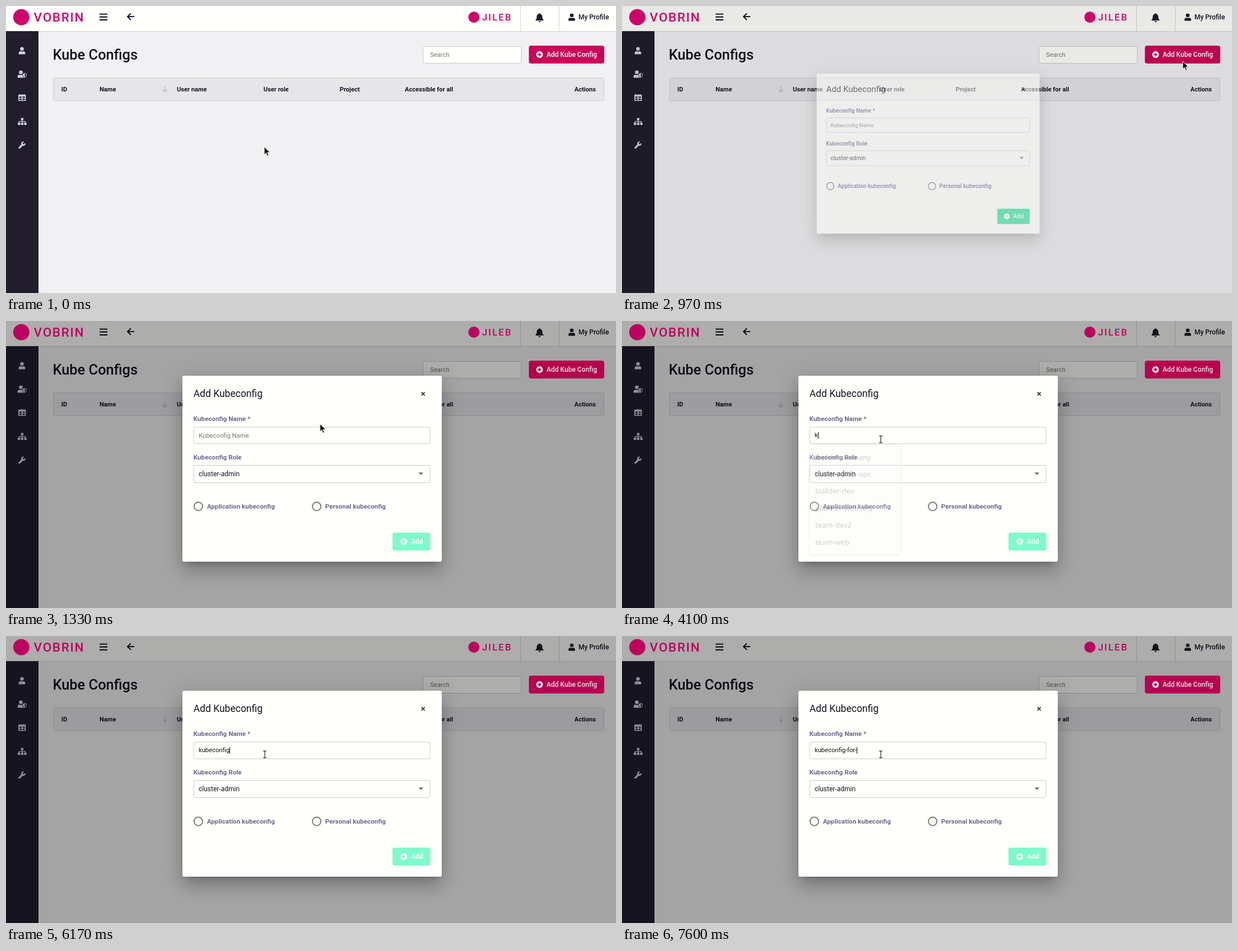
An HTML page that plays this animation: 1089x514 px, repeating every 8 s.

```html
<!DOCTYPE html>
<html lang="en">
<head>
<meta charset="utf-8">
<title>Add Kubeconfig</title>
<style>
  html, body { margin: 0; width: 100%; height: 100%; overflow: hidden; }
  body { position: relative; background: #f1f1f3; font-family: Roboto, sans-serif; }
  .layer { position: absolute; left: 0; top: 0; width: 1089px; height: 514px; }
  svg.layer { display: block; overflow: hidden; }
  svg text { fill: #15121f; }

  .title { font-size: 25.4px; font-weight: 500; }
  .head text { font-size: 11.1px; font-weight: 700; }
  .ui { font-size: 12px; }
  .medium { font-weight: 500; }
  .hint { font-size: 11.3px; }
  svg .hint { fill: #757575; }
  .labels text { font-size: 11.7px; font-weight: 700; fill: #6d6790; }
  svg .light { fill: #fff; }
  svg .brand { fill: #d0036a; font-weight: 500; }
  .field { fill: #fffffc; stroke: #c9c9cd; }
  .nav { fill: #d3d1dc; color: #d3d1dc; }

  .loop, .loop * { animation-duration: 8s; animation-iteration-count: infinite; animation-timing-function: linear; }

  #accent { animation-name: accent; }
  #addConfig { animation-name: hover; }
  #backdrop { background: rgba(0, 0, 0, .32); animation-name: backdrop; }
  #dialog { transform-origin: 546.5px 264.5px; animation-name: dialog; }
  #panel {
    position: absolute; left: 315px; top: 98px; width: 463px; height: 333px;
    border-radius: 3px; background: #fffffb;
    box-shadow: 0 9px 12px -6px rgba(0,0,0,.2), 0 19px 30px 2px rgba(0,0,0,.14), 0 7px 37px 6px rgba(0,0,0,.12);
  }
  #submit { animation-name: submit; }
  #entry { position: absolute; left: 344px; top: 199px; height: 12px; display: flex; font-size: 11.2px; line-height: 12px; white-space: pre; color: #111; }
  #caret { width: 1px; height: 12px; background: #000; }

  #menu {
    position: absolute; left: 335px; top: 221px; width: 162px; height: 197px; box-sizing: border-box; padding: 7.5px 10px;
    border-radius: 0 0 3px 3px; background: #f9f9f9; box-shadow: 0 1px 4px rgba(0,0,0,.42);
    font: 500 13px/30.4px "Noto Sans", sans-serif; color: #333; animation-name: menu;
  }
  #pointer { animation-name: pointer; }
  #arrow { animation-name: arrow; }
  #beam { animation-name: beam; }

  @keyframes accent { 0%, 11.725% { filter: brightness(1); } 16.725%, 100% { filter: brightness(.9); } }
  @keyframes hover { 0%, 9.5% { fill: #cc0058; } 10.5%, 16% { fill: #c00051; } 17%, 100% { fill: #cc0058; } }
  @keyframes backdrop {
    0% { opacity: 0; }
    11.725% { opacity: 0; animation-timing-function: cubic-bezier(.25, .8, .25, 1); }
    16.725%, 100% { opacity: 1; }
  }
  @keyframes dialog {
    0% { opacity: 0; transform: scale(.7); }
    11.725% { opacity: 0; transform: scale(.7); animation-timing-function: cubic-bezier(0, 0, .2, 1); }
    13.6%, 100% { opacity: 1; transform: none; }
  }
  @keyframes submit { 0%, 12.5% { fill: #16de90; } 16%, 100% { fill: #7ffacb; } }
  @keyframes menu { 0%, 48.374% { opacity: 0; } 48.375%, 49.5% { opacity: 1; } 51.8%, 100% { opacity: 0; } }
  @keyframes pointer {
    0% { transform: translate(461px, 252px); }
    1.25% { transform: translate(461px, 252px); animation-timing-function: steps(4, start); }
    6.25% { transform: translate(988px, 175px); }
    7.5% { transform: translate(988px, 175px); animation-timing-function: ease-out; }
    10.6%, 13.4% { transform: translate(1001px, 99px); animation-timing-function: ease-in-out; }
    16.6%, 17.499% { transform: translate(560.5px, 184px); }
    17.5% { transform: translate(560px, 186px); }
    17.875% { transform: translate(560px, 186px); animation-timing-function: steps(4, start); }
    22.875%, 100% { transform: translate(462px, 212px); }
  }
  @keyframes arrow { 0%, 17.499% { opacity: 1; } 17.5%, 100% { opacity: 0; } }
  @keyframes beam { 0%, 17.499% { opacity: 0; } 17.5%, 100% { opacity: 1; } }
</style>
</head>
<body>

<svg class="layer" viewBox="0 0 1089 514">
  <defs>
    <g id="user">
      <circle cy="-3.2" r="3.3"/>
      <path d="M-6 6.4V4.6C-6 2.3-4.4.9-2.4.9Q0 2 2.4.9C4.4.9 6 2.3 6 4.6V5.2Q6 6.4 4.8 6.4H-4.8Q-6 6.4-6 5.2z"/>
    </g>
    <g id="plus">
      <circle r="6" fill="#fff"/>
      <path d="M-3.3 0H3.3M0-3.3V3.3" fill="none" stroke="currentColor" stroke-width="1.8"/>
    </g>
  </defs>

  <rect width="1089" height="45" fill="#fffffc"/>
  <path d="M0 45.5H1089M918.5 0V45M987.5 0V45" stroke="#d2d2d4"/>
  <rect y="45" width="58" height="469" fill="#211d2d"/>

  <g fill="none" stroke="#1c1928" stroke-width="2.2">
    <path d="M167 14.5H181M167 19.7H181M167 24.9H181"/>
    <path d="M229 19H217.5M222.8 13.2L217 19L222.8 24.8"/>
  </g>
  <g transform="translate(952.5 21)" fill="#1c1928">
    <path d="M0-8C.8-8 1.2-7.4 1.2-6.7C4-6 5-4 5-1.5C5 1.5 5.8 2.5 7 3.7V5H-7V3.7C-5.8 2.5-5 1.5-5-1.5C-5-4-4-6-1.2-6.7C-1.2-7.4-.8-8 0-8z"/>
    <path d="M-2 6H2A2 2 0 0 1-2 6z"/>
  </g>
  <use href="#user" x="1010" y="20" fill="#1c1928"/>
  <text class="ui medium" x="1022" y="24.4">My Profile</text>

  <g class="nav">
    <use href="#user" x="28.5" y="80"/>
    <use href="#user" x="26.5" y="122"/>
    <path d="M33.5 119.8L37.6 121.3C37.6 125 36.2 127.6 33.5 129C30.8 127.6 29.4 125 29.4 121.3z" stroke="#211d2d" stroke-width=".9"/>
    <path d="M33.5 121.2V127.4C35.2 126.2 36.1 124.5 36.3 122.2z" fill="#211d2d"/>
    <rect x="22" y="158.5" width="13.4" height="11.6" rx="1.4"/>
    <path d="M23.7 162.2H27.9V164.4H23.7zM29.5 162.2H33.7V164.4H29.5zM23.7 166H27.9V168.4H23.7zM29.5 166H33.7V168.4H29.5z" fill="#211d2d"/>
    <path d="M26.7 200.5H31V204.6H26.7zM21 209H25.3V213H21zM26.7 209H31V213H26.7zM32.4 209H36.7V213H32.4z"/>
    <path d="M28.8 204V209M23.1 209.5V206.9H34.5V209.5" fill="none" stroke="currentColor" stroke-width="1.3"/>
    <g transform="translate(28.5 249)" fill="none" stroke="currentColor" stroke-linecap="round">
      <path d="M-4.6 4.8L1.2-1" stroke-width="3.2"/>
      <path d="M5.2-2.9A2.8 2.8 0 1 1 2.9-5.2" stroke-width="2.3" stroke-linecap="butt"/>
    </g>
  </g>

  <text class="title" x="83.5" y="96">Kube Configs</text>
  <rect class="field" x="744.5" y="72.5" width="175.5" height="30" rx="3"/>
  <text class="hint" x="757" y="91.2">Search</text>

  <rect x="84.5" y="128.5" width="983" height="41" rx="3" fill="#e6e6e9" stroke="#cfcfd3"/>
  <g class="head">
    <text x="98.7" y="153.2">ID</text>
    <text x="167" y="153.2">Name</text>
    <text x="305" y="153.2">User name</text>
    <text x="459.7" y="153.2">User role</text>
    <text x="595.8" y="153.2">Project</text>
    <text x="712" y="153.2">Accessible for all</text>
    <text x="1053" y="153.2" text-anchor="end">Actions</text>
  </g>
  <path d="M283.7 143.5V154M279.2 149.7L283.7 154.2L288.2 149.7" fill="none" stroke="#bcbcc4" stroke-width="1.5"/>
</svg>

<div id="backdrop" class="layer loop"></div>

<svg id="accent" class="layer loop" viewBox="0 0 1089 514">
  <circle cx="27.3" cy="20" r="14.5" fill="#d0036a"/>
  <text class="brand" x="49.5" y="28.3" font-size="22.5" letter-spacing="1.7">VOBRIN</text>
  <circle cx="835.3" cy="20" r="10" fill="#d0036a"/>
  <text class="brand" x="850" y="26" font-size="16.5" letter-spacing="2.2">JILEB</text>
  <rect id="addConfig" x="933.5" y="71" width="134.5" height="32" rx="4"/>
  <use href="#plus" x="952.5" y="87" color="#cc0058"/>
  <text class="ui medium light" x="965" y="91.3">Add Kube Config</text>
</svg>

<div id="dialog" class="layer loop">
  <div id="panel"></div>
  <svg class="layer" viewBox="0 0 1089 514">
    <text x="334.7" y="136.3" font-size="17.5">Add Kubeconfig</text>
    <path d="M741.6 127.4L747.6 133.4M747.6 127.4L741.6 133.4" stroke="#3f3c49" stroke-width="2"/>
    <rect class="field" x="335" y="190" width="422" height="30" rx="3"/>
    <rect class="field" x="335" y="258.5" width="422" height="31" rx="3"/>
    <text id="placeholder" class="hint" x="344" y="209">Kubeconfig Name</text>
    <text class="ui" x="344" y="278">cluster-admin</text>
    <path d="M736.2 271.3H745.2L740.7 275.8z" fill="#6f6f6f"/>
    <g class="labels">
      <text x="334.5" y="179.2">Kubeconfig Name *</text>
      <text x="334.5" y="247.8">Kubeconfig Role</text>
      <text x="358.7" y="336.2">Application kubeconfig</text>
      <text x="569.7" y="336.2">Personal kubeconfig</text>
    </g>
    <g fill="none" stroke="#6b6b6b" stroke-width="1.7">
      <circle cx="343.4" cy="332" r="7.6"/>
      <circle cx="554.6" cy="332" r="7.6"/>
    </g>
    <rect id="submit" x="690" y="379" width="67.5" height="32" rx="3.5"/>
    <use href="#plus" x="710" y="395" color="#7ffacb"/>
    <text class="ui medium light" x="723" y="399.2">Add</text>
  </svg>
  <div id="entry"><span id="typed"></span><span id="caret"></span></div>
</div>

<div class="loop">
  <div id="menu">
    <div>builder-web-any</div>
    <div>builder-web-ops</div>
    <div>builder-dev</div>
    <div>planner-web-any</div>
    <div>team-dev2</div>
    <div>team-web</div>
  </div>
</div>

<svg class="layer loop" viewBox="0 0 1089 514">
  <g id="pointer">
    <path id="arrow" d="M0 0V14.2L3.2 11.2L5.6 16.6L8 15.5L5.7 10.3H10z" fill="#161616" stroke="#fff" stroke-width=".9"/>
    <g id="beam" fill="none">
      <path d="M-3-6.2H-1Q0-6.2 0-5.2Q0-6.2 1-6.2H3M0-5.2V5.2M-3 6.2H-1Q0 6.2 0 5.2Q0 6.2 1 6.2H3" stroke="#fff" stroke-width="2.6"/>
      <path d="M-3-6.2H-1Q0-6.2 0-5.2Q0-6.2 1-6.2H3M0-5.2V5.2M-3 6.2H-1Q0 6.2 0 5.2Q0 6.2 1 6.2H3" stroke="#222" stroke-width="1.2"/>
    </g>
  </g>
</svg>

<script>
  const LOOP = 8000;
  const message = 'kubeconfig-for-';
  const keyTimes = [3970, 4170, 4870, 4970, 5200, 5330, 5500, 5930, 6030, 6170, 6770, 7070, 7230, 7370, 7600];
  const focusTime = 3870;
  const blink = { from: 4570, to: 4870 };

  const byId = id => document.getElementById(id);
  const typed = byId('typed');
  const caret = byId('caret');
  const placeholder = byId('placeholder');
  const show = (element, visible) => { element.style.visibility = visible ? 'visible' : 'hidden'; };
  const start = performance.now();

  function render() {
    const time = (performance.now() - start) % LOOP;
    const count = keyTimes.filter(key => key <= time).length;
    typed.textContent = message.slice(0, count);
    show(placeholder, count === 0);
    show(caret, time >= focusTime && !(time >= blink.from && time < blink.to));
    requestAnimationFrame(render);
  }
  render();
</script>
</body>
</html>
```
